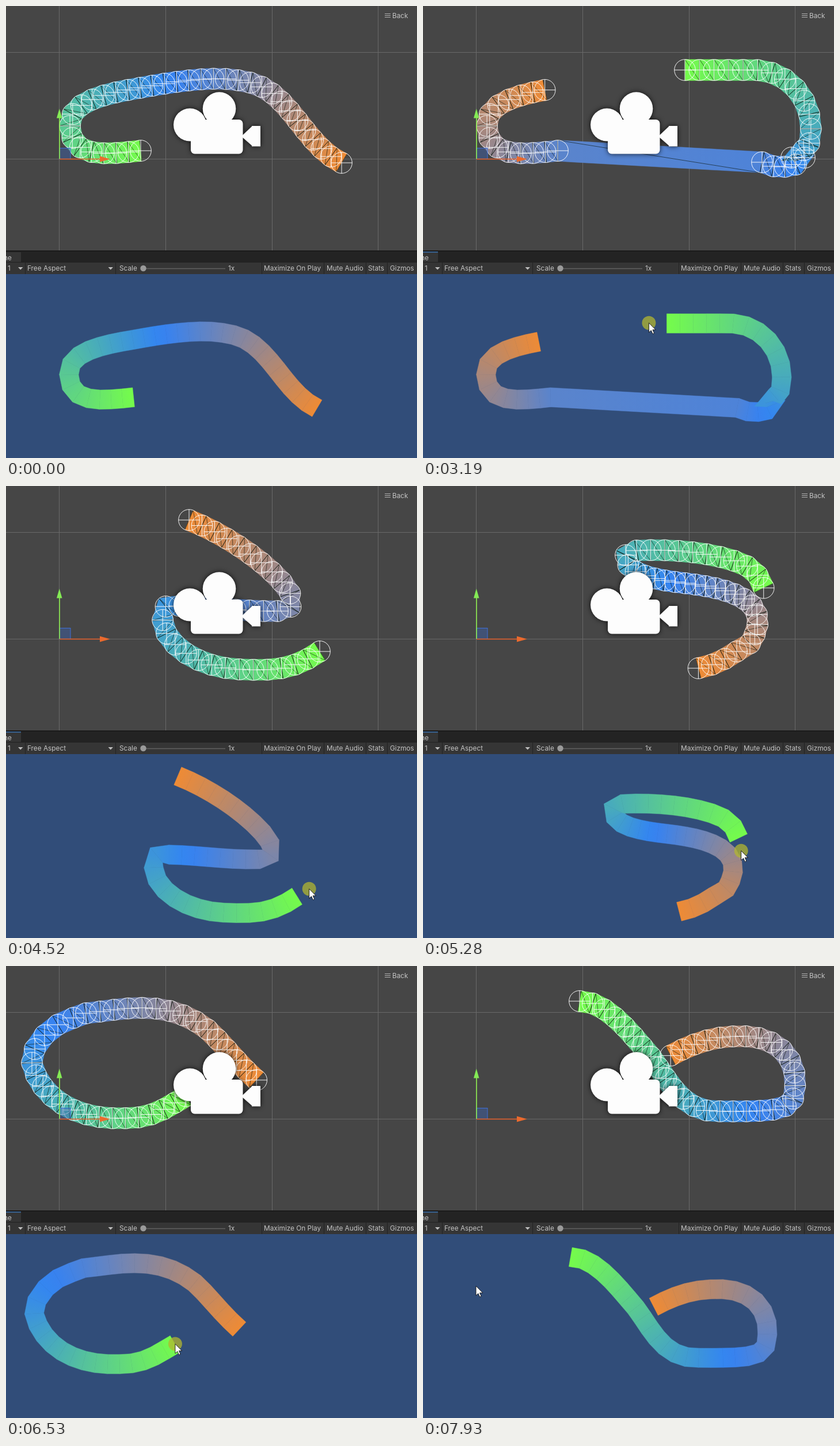
Recreate the animation shown at these times as an HTML page. Size 714 by 784 pixels, loop 8000 ms.

```html
<!DOCTYPE html>
<html lang="en">
<head>
<meta charset="utf-8">
<title>Trail drawing</title>
<style>
  html, body { margin: 0; width: 100%; height: 100%; overflow: hidden; background: #464646; }
  svg { display: block; width: 714px; height: 784px; }
  text { font: 11.8px Inter, Roboto, sans-serif; fill: #c4c4c4; }
  #camera { filter: drop-shadow(0 0 4px rgba(0, 0, 0, .8)); }
</style>
</head>
<body>
<svg viewBox="0 0 714 784" xmlns="http://www.w3.org/2000/svg">
  <defs id="defs"></defs>

  <!-- scene view -->
  <rect width="714" height="424" fill="#464646"/>
  <path d="M92.5 0V424M277.5 0V424M462.5 0V424M646.5 0V424M0 80.5H714M0 265.5H714" stroke="#696969"/>
  <g id="ribbon"></g>
  <path id="wire" fill="none" stroke="#0a140a" stroke-opacity=".75" stroke-width=".8"/>
  <path id="rings" fill="none" stroke="#fff" stroke-opacity=".92"/>
  <rect x="93" y="246.5" width="19" height="19" fill="#3a5fae" fill-opacity=".45" stroke="#3f6fd6"/>
  <path d="M93 265.5H164" stroke="#e8622d" stroke-width="1.4"/>
  <path d="M163 260.5L181 265.5L163 270.5Z" fill="#ea6a2e"/>
  <path d="M93 265V193" stroke="#8ff04f" stroke-width="1.6"/>
  <path d="M88 194.5L92.7 178L97.5 194.5Z" fill="#84ea55"/>
  <g id="camera" fill="#fdfdfd">
    <circle cx="319.5" cy="206" r="28.5"/>
    <circle cx="370.5" cy="178" r="28.8"/>
    <rect x="321" y="197" width="90.5" height="59.5" rx="7"/>
    <path d="M411 224L427 209V208H442V243.5H427V242L411 228Z"/>
  </g>
  <path d="M658 13.5H668M658 16.5H668M658 19.5H668" stroke="#b0b0b0"/>
  <text x="671" y="20.5">Back</text>

  <!-- game view -->
  <rect y="424" width="714" height="21" fill="#232323"/>
  <rect y="424" width="714" height="1.5" fill="#171717"/>
  <rect y="427" width="26" height="18" fill="#353535"/>
  <rect id="focus" y="426" width="26" height="1.5" fill="#3a72b0"/>
  <text x="-4" y="441">ne</text>
  <rect y="445" width="714" height="20" fill="#353535"/>
  <path d="M33.5 445V465M190.5 445V465M444.5 445V465M552.5 445V465M625.5 445V465M662.5 445V465M0 444.5H714" stroke="#222"/>
  <path d="M21 453H29.5L25.2 457.5ZM177.5 453H186L181.7 457.5Z" fill="#bdbdbd"/>
  <path d="M240 455.5H381" stroke="#606060" stroke-width="1.5"/>
  <circle cx="238.5" cy="455" r="5.2" fill="#9a9a9a"/>
  <text x="3" y="459">1</text>
  <text x="37" y="459">Free Aspect</text>
  <text x="197" y="459">Scale</text>
  <text x="386" y="459">1x</text>
  <text x="448" y="459">Maximize On Play</text>
  <text x="557" y="459">Mute Audio</text>
  <text x="629" y="459">Stats</text>
  <text x="667" y="459">Gizmos</text>
  <rect y="465" width="714" height="319" fill="#314d79"/>
  <use href="#ribbon" transform="matrix(.9133 0 0 .915 7.9 449)"/>

  <g id="cursor">
    <circle id="press" r="12" fill="#b2b530" fill-opacity=".75"/>
    <path d="M0 0V16.5L3.9 13L6.6 19L9.2 17.9L6.6 12H11.8Z" fill="#fff" stroke="#111" stroke-width=".9"/>
  </g>
</svg>
<script>
const LOOP = 8000, COUNT = 34, R = 18.3;
const ENTER = 130, CLICK = 1680, DRAG = 2050, RELEASE = 7690, REST = 7930;
const ORANGE = [238, 139, 53], BLUE = [50, 130, 245], GREEN = [117, 252, 75];

const $ = id => document.getElementById(id);
const mix = (a, b, u) => a + (b - a) * u;

function set(el, attrs) {
  for (const k in attrs) el.setAttribute(k, attrs[k]);
  return el;
}

function make(name, attrs = {}) {
  return set(document.createElementNS("http://www.w3.org/2000/svg", name), attrs);
}

// A curve as a function of its progress, 0 to 1, by arc length.
function curve(d) {
  const path = make("path", { d }), length = path.getTotalLength();
  return u => path.getPointAtLength(length * Math.max(0, Math.min(1, u)));
}

// Lays evenly spaced trail points along a curve between two times.
function stroke(from, to, count, d) {
  const at = curve(d);
  return Array.from({ length: count }, (_, i) => {
    const u = count > 1 ? i / (count - 1) : 0, { x, y } = at(u);
    return { x, y, t: mix(from, to, u) };
  });
}

const points = [
  stroke(-1, -1, COUNT, "M583 272C515 240 492 141 414 131C370 120 300 130 250 139C200 148 111 158 111 205C111 265 170 258 234 251"),
  stroke(CLICK, CLICK, 1, "M589 271h1"),
  stroke(2060, 2500, 4, "M609 278Q650 283 663 263"),
  stroke(2770, 2795, 2, "M640 263L661 250"),
  stroke(2820, 3170, 13, "M671 238C686 172 640 111 575 111H455"),
  stroke(3215, 3760, 19, "M421 110L250 107C110 105 140 15 290 49"),
  stroke(3785, 4500, COUNT, "M318 59C410 95 497 170 497 198C500 220 470 217 450 217C390 216 340 207 278 208C252 255 315 313 403 318C460 320 495 322 545 287"),
  stroke(4540, 4900, 19, "M568 273C620 190 510 175 450 168S350 150 352 120"),
  stroke(4920, 6020, COUNT, "M371 112C440 108 530 118 570 143C595 160 608 225 584 233C560 235 530 235 503 233C440 225 390 145 350 110C280 55 205 75 139 82"),
  stroke(6060, 6160, 4, "M117 90Q70 105 50 144"),
  stroke(6185, 7000, COUNT, "M45 168C52 205 95 268 205 264C265 265 285 238 330 217C390 185 455 122 545 122C615 118 660 160 643 230"),
  stroke(7040, RELEASE, 20, "M630 243C612 254 550 252 503 252C445 247 425 195 395 156C365 122 320 60 272 61")
].flat();

const approach = curve("M447 770Q540 692 628 692L545 698");
const leave = curve("M205 509L92 555");

function colour(i) {
  const u = 2 * i / (COUNT - 1);
  const [a, b, v] = u < 1 ? [ORANGE, BLUE, u] : [BLUE, GREEN, u - 1];
  return `rgb(${a.map((c, k) => Math.round(mix(c, b[k], v)))})`;
}

const quads = Array.from({ length: COUNT - 1 }, (_, i) => {
  const grad = make("linearGradient", { id: "g" + i, gradientUnits: "userSpaceOnUse" });
  const paint = `url(#g${i})`;
  const shape = make("polygon", { fill: paint, stroke: paint, "stroke-width": .5 });
  grad.append(
    make("stop", { offset: 0, "stop-color": colour(i) }),
    make("stop", { offset: 1, "stop-color": colour(i + 1) })
  );
  $("defs").append(grad);
  $("ribbon").append(shape);
  return { grad, shape };
});

function direction(a, b) {
  const dx = b.x - a.x, dy = b.y - a.y, len = Math.hypot(dx, dy) || 1;
  return [dx / len, dy / len];
}

// Left and right ribbon corners at every trail point.
function corners(trail) {
  return trail.map((p, i) => {
    const before = i ? direction(trail[i - 1], p) : [0, 0];
    const after = i < trail.length - 1 ? direction(p, trail[i + 1]) : [0, 0];
    const dx = before[0] + after[0], dy = before[1] + after[1];
    const k = R / (Math.hypot(dx, dy) || 1);
    return [[p.x + dy * k, p.y - dx * k], [p.x - dy * k, p.y + dx * k]]
      .map(c => c.map(v => v.toFixed(2)).join(" "));
  });
}

function drawTrail(head) {
  const trail = points.slice(head - COUNT + 1, head + 1);
  const edge = corners(trail);
  let wire = "";
  quads.forEach(({ grad, shape }, i) => {
    const a = trail[i], b = trail[i + 1], [l0, r0] = edge[i], [l1, r1] = edge[i + 1];
    set(grad, { x1: a.x, y1: a.y, x2: b.x, y2: b.y });
    set(shape, { points: [l0, l1, r1, r0].join(" ") });
    wire += `M${r0}L${l0}L${r1}L${l1}`;
  });
  set($("wire"), { d: wire });
  set($("rings"), { d: trail.map(({ x, y }) =>
    `M${x - R} ${y}a${R} ${R} 0 1 1 ${2 * R} 0a${R} ${R} 0 1 1 ${-2 * R} 0h${2 * R}M${x} ${y - R}v${2 * R}`).join("") });
}

// While drawing, the cursor runs one point ahead of the trail.
function cursorAt(t, head) {
  if (t < DRAG) return approach((t - ENTER) / (CLICK - ENTER));
  if (t >= RELEASE) return leave((t - RELEASE) / (REST - RELEASE));
  const a = points[head], b = points[head + 1], u = Math.min(1, (t - a.t) / 18);
  return { x: mix(a.x, b.x, u) * .9133 + 7.9, y: mix(a.y, b.y, u) * .915 + 449 };
}

let shown = -1;
function render(t) {
  let head = points.length - 1;
  while (points[head].t > t) head--;
  if (head !== shown) drawTrail(shown = head);
  const { x, y } = cursorAt(t, head);
  set($("cursor"), { transform: `translate(${x} ${y})`, visibility: t < ENTER ? "hidden" : "visible" });
  set($("press"), { opacity: t >= DRAG && t < RELEASE ? 1 : 0 });
  set($("focus"), { opacity: t >= CLICK ? 1 : 0 });
}

const start = performance.now();
function tick() {
  render((performance.now() - start) % LOOP);
  requestAnimationFrame(tick);
}
tick();
</script>
</body>
</html>
```
